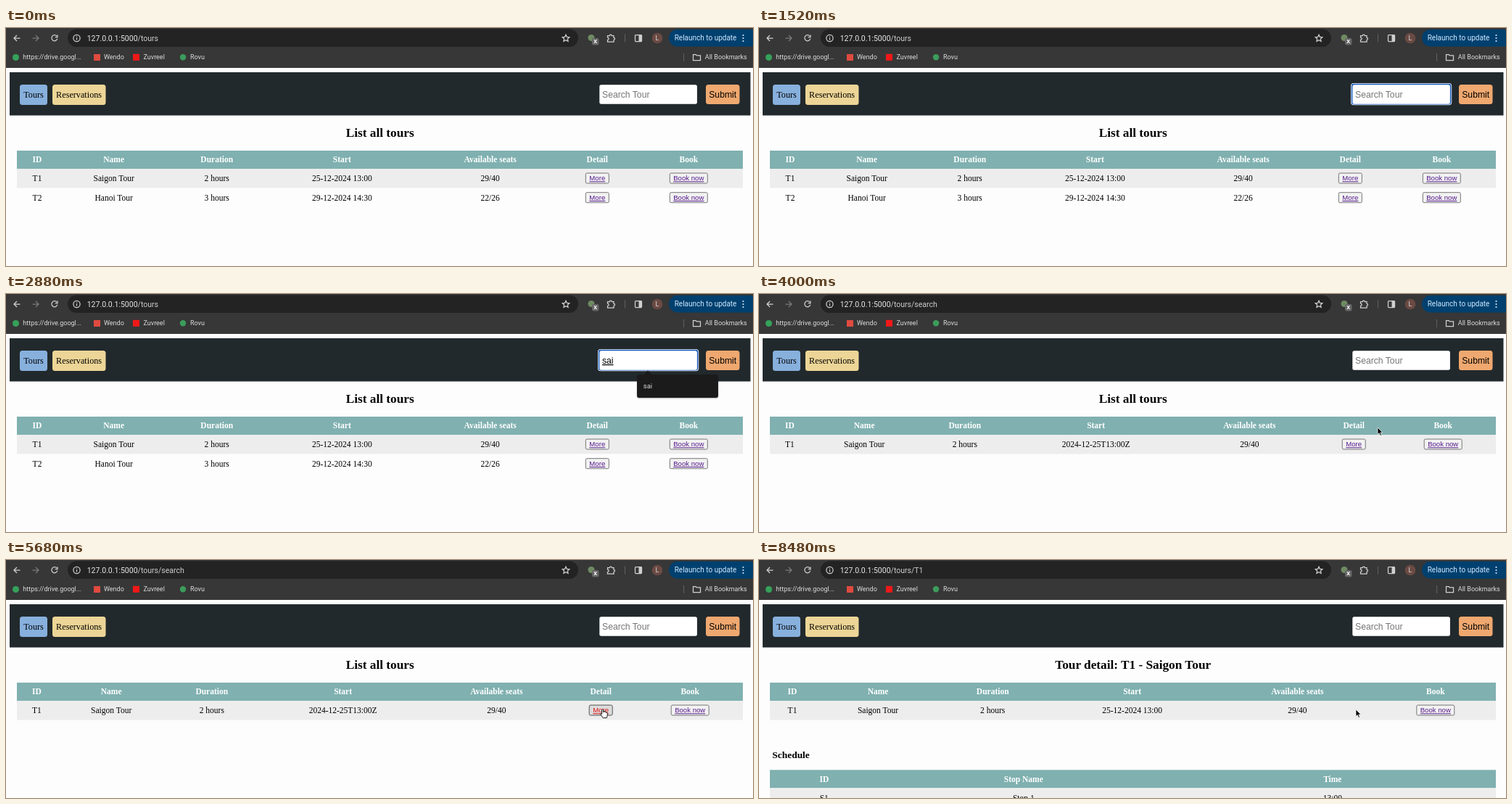
These frames come from a looping animation (1030 by 328 pixels, 8560 ms). An HTML page:

```html
<!DOCTYPE html>
<html lang="en">
<head>
<meta charset="utf-8">
<title>Tours</title>
<style>
  html, body { margin: 0; width: 100%; height: 100%; overflow: hidden; background: #fdfdfd; }
  svg { display: block; }
  text { white-space: pre; }
  .ui { font-family: Roboto, Inter, sans-serif; font-size: 9px; fill: #dcdcdc; }
  .serif { font-family: "Liberation Serif", "Times New Roman", serif; font-size: 11.5px; }
  .sans { font-family: "Liberation Sans", Arial, sans-serif; font-size: 12.2px; }
  .mid { text-anchor: middle; }
  .bold { font-weight: bold; }
  .link { font-size: 9.6px; fill: #551a8b; text-decoration: underline; }
  .btn { fill: #f2f2f2; stroke: #767676; }
  .active .btn { fill: #dcdcdc; stroke: #555; }
  .active .link { fill: #e01010; }
  .line { fill: none; stroke: #d0d0d0; stroke-width: 1.25; }
</style>
</head>
<body>
<svg width="1030" height="328" viewBox="0 0 1030 328">
  <rect width="1030" height="328" fill="#fdfdfd"/>

  <!-- Browser bar -->
  <rect width="1030" height="55" fill="#373737"/>
  <rect x="85" y="1.5" width="704" height="24.5" rx="12.25" fill="#232323"/>
  <g class="line">
    <path d="M19.5 14H11M15 10l-4 4 4 4"/>
    <path d="M36.5 14H45M41 10l4 4-4 4" stroke="#7b7b7b"/>
    <path d="M70 11.2A4 4 0 1 0 70.8 14.7M71 9.5V12.6H67.8"/>
    <circle cx="97.5" cy="14" r="4.6"/>
    <path d="M97.5 13.2V16.6M97.5 11.2V12.3"/>
    <path d="M772 9.2l1.4 3.1 3.4.4-2.5 2.3.7 3.3-3-1.7-3 1.7.7-3.3-2.5-2.3 3.4-.4z"/>
    <path d="M829.5 10.5h2.8a1.5 1.5 0 0 1 3 0h2.7v2.8a1.5 1.5 0 0 1 0 3v2.7h-8.5v-2.6a1.6 1.6 0 0 0 0-3.2z"/>
    <path d="M853.5 8.5V19.5M934.5 35V46" stroke="#606060" stroke-width="1"/>
    <rect x="867.5" y="9.5" width="9" height="9" rx="1"/>
    <path d="M947.5 36.5h3.6l1.3 1.4h5.1v6.6h-10z"/>
  </g>
  <rect x="872.5" y="9.5" width="4" height="9" fill="#d0d0d0"/>
  <circle cx="807" cy="13.5" r="4.5" fill="#6f8a62"/>
  <rect x="808" y="14" width="9.5" height="9.5" rx="2" fill="#666"/>
  <text class="ui mid bold" x="812.7" y="21.4" style="font-size:7.5px;fill:#fff">X</text>
  <circle cx="898" cy="14" r="7.3" fill="#6b4a43"/>
  <text class="ui mid" x="898" y="17">L</text>
  <rect x="914" y="2" width="124" height="23.5" rx="11.75" fill="#00406f"/>
  <text class="ui" x="921.7" y="17.3" style="font-size:10px;fill:#cfe9ff">Relaunch to update</text>
  <g fill="#cfe9ff">
    <circle cx="1016.5" cy="10" r="1.1"/><circle cx="1016.5" cy="14" r="1.1"/><circle cx="1016.5" cy="18" r="1.1"/>
  </g>
  <text class="ui" x="111.7" y="17.6" style="font-size:10.5px;fill:#e8e8e8">127.0.0.1:5000<tspan id="path" fill="#cccccc"></tspan></text>
  <circle cx="13.5" cy="40.5" r="4.5" fill="#35a25a"/>
  <text class="ui" x="23.3" y="43.4">https://drive.googl...</text>
  <rect x="121" y="36" width="9" height="9" fill="#e04a3f"/>
  <text class="ui" x="135" y="43.4">Wendo</text>
  <rect x="175" y="35.8" width="9" height="9" fill="#f01818"/>
  <text class="ui" x="189.5" y="43.4">Zuvreel</text>
  <circle cx="244" cy="40.3" r="4.2" fill="#3c9c5c"/>
  <text class="ui" x="254" y="43.4">Rovu</text>
  <text class="ui" x="963.8" y="43.4">All Bookmarks</text>

  <!-- Page navigation -->
  <rect x="5" y="61" width="1021.5" height="59.5" fill="#22292c"/>
  <rect x="19" y="78" width="38" height="28" rx="3.5" fill="#87b0dd"/>
  <rect x="64" y="78" width="73.5" height="28" rx="3.5" fill="#ecd596"/>
  <g class="serif mid" style="font-size:12.2px">
    <text x="38" y="96">Tours</text>
    <text x="100.6" y="96">Reservations</text>
  </g>
  <g id="ring">
    <rect x="816" y="76" width="139.2" height="30.2" rx="4" fill="#fff"/>
    <rect x="816.8" y="76.8" width="137.6" height="28.6" rx="3.4" fill="#1458b8"/>
  </g>
  <rect x="818.3" y="78.3" width="134.6" height="26.4" rx="2.5" fill="#fff"/>
  <text id="hint" class="sans" x="822" y="96" fill="#757575">Search Tour</text>
  <text id="typed" class="sans" x="822" y="96" text-decoration="underline"></text>
  <rect id="caret" y="85" width="1" height="13" fill="#000"/>
  <rect x="965" y="78" width="46.5" height="27" rx="3.5" fill="#efa86f"/>
  <text class="sans mid" x="988.2" y="96">Submit</text>

  <g id="pages"></g>

  <g id="suggest">
    <rect x="869.5" y="111.5" width="113" height="33" rx="3.5" fill="#000" opacity=".18"/>
    <path d="M879 111.5L885 105.5L891 111.5z" fill="#1b1b1b"/>
    <rect x="870" y="111" width="112" height="32" rx="3" fill="#1b1b1b"/>
    <text class="ui" x="878.8" y="130.3" style="font-size:9.4px">sai</text>
  </g>

  <g id="cursor">
    <path id="arrow" d="M0 0V9.6L2.2 7.6 3.8 11.2 5.4 10.5 3.9 7 6.9 6.9z" fill="#000" stroke="#fff" stroke-width=".7"/>
    <path id="beam" d="M-2.2-5.5Q0-5.5 0-4Q0-5.5 2.2-5.5M0-4.5V4.5M-2.2 5.5Q0 5.5 0 4Q0 5.5 2.2 5.5M-1.2 1.8H1.2" fill="none" stroke="#111"/>
    <path id="hand" d="M-1.4.6Q-.4-.7.7.6V4Q2-.1+2.6 3.4Q4 2.8 4.4 4.2Q6.2 3.8 6.2 5.4V8.2Q6 9.6 5.2 11.6H.2Q-1.4 9-3.5 6.4Q-3.6 4.8-1.4 6.4z" fill="#fff" stroke="#111" stroke-width=".95"/>
  </g>
</svg>
<script>
const STEP = 80, LOOP = 8560;
const FOCUS = 880, FOUND = 2960, PRESS = 5520, DETAIL = 5840, RELEASE = 6800;
const $ = id => document.getElementById(id);
const show = (id, on) => $(id).setAttribute('visibility', on ? 'visible' : 'hidden');

const rect = (x, y, w, h, fill) => `<rect x="${x}" y="${y}" width="${w}" height="${h}" fill="${fill}"/>`;
const text = (x, y, s, cls) => `<text x="${x}" y="${y}" class="${cls}">${s}</text>`;

function button(x, y, label) {
  const w = label === 'More' ? 32 : 52;
  return `<g class="${label === 'More' ? 'more' : ''}">
    <rect class="btn" x="${x - w / 2}" y="${y - 7}" width="${w}" height="14" rx="1.8"/>
    ${text(x, y + 3.3, label, 'sans mid link')}</g>`;
}

// The first row of cells is the table head.
function table(top, xs, rows) {
  return rows.map((cells, i) => {
    const y = top + (i ? 25 + (i - 1) * 26.7 : 0);
    const back = i ? rect(15, y, 1001, 26.5, i % 2 ? '#ededed' : '#fdfdfd') : rect(15, y, 1001, 25, '#80b0b0');
    return back + cells.map((s, k) =>
      /^(More|Book now)$/.test(s) ? button(xs[k], y + 13, s)
      : text(xs[k], y + (i ? 17.2 : 16.4), s, i ? 'serif mid' : 'serif mid bold head')).join('');
  }).join('');
}

const page = (id, title, body) =>
  `<g id="${id}">${text(515.7, 150.3, title, 'serif mid bold title')}${body}</g>`;

const head = ['ID', 'Name', 'Duration', 'Start', 'Available seats', 'Detail', 'Book'];
$('pages').innerHTML =
  page('list', 'List all tours', table(169, [43, 148.7, 290.7, 463.3, 667.7, 815.3, 941.3], [
    head,
    ['T1', 'Saigon Tour', '2 hours', '25-12-2024 13:00', '29/40', 'More', 'Book now'],
    ['T2', 'Hanoi Tour', '3 hours', '29-12-2024 14:30', '22/26', 'More', 'Book now']])) +
  page('found', 'List all tours', table(169, [42.3, 145.2, 283.8, 464.6, 676.3, 820.2, 943.2], [
    head,
    ['T1', 'Saigon Tour', '2 hours', '2024-12-25T13:00Z', '29/40', 'More', 'Book now']])) +
  page('detail', 'Tour detail: T1 - Saigon Tour', table(169, [46, 164, 322.2, 514.6, 742.4, 932.8], [
    head.filter(s => s !== 'Detail'),
    ['T1', 'Saigon Tour', '2 hours', '25-12-2024 13:00', '29/40', 'Book now']]) +
    `<text x="18.3" y="272.5" class="serif bold" style="font-size:13.45px">Schedule</text>` +
    table(289.3, [89.8, 364.8, 790.8], [['ID', 'Stop Name', 'Time'], ['S1', 'Stop 1', '13:00']]));
document.querySelectorAll('.title').forEach(e => e.style.fontSize = '17.25px');
document.querySelectorAll('.head').forEach(e => e.style.fill = '#fff');

const keys = [[1600, 's'], [1840, 'sa'], [2080, 'sai']];
const typedAt = t => keys.reduce((s, [at, v]) => t >= at && t < FOUND ? v : s, '');

// Pointer stops: time, x, y
const stops = [[80, 906, 284], [800, 899, 94.5], [3120, 899, 94.5], [3840, 853, 184],
  [4320, 853, 184], [5040, 823, 206], [LOOP, 823, 206]];

function pointerAt(t) {
  let i = 0;
  while (i < stops.length - 2 && t >= stops[i + 1][0]) i++;
  const [a, x, y] = stops[i], [b, u, v] = stops[i + 1];
  const p = Math.max(0, Math.min(1, (t - a) / (b - a)));
  const e = p * p * (3 - 2 * p);
  return [x + (u - x) * e, y + (v - y) * e];
}

function pointerShape(t, x, y) {
  if (t < 80 || (t >= 1520 && t < 3120)) return '';
  if (x > 818 && x < 953 && y > 78 && y < 105) return 'beam';
  const overMore = x > 804 && x < 836 && y > 200 && y < 214;
  return overMore && t < RELEASE ? 'hand' : 'arrow';
}

function draw(t) {
  const name = t < FOUND ? 'list' : t < DETAIL ? 'found' : 'detail';
  for (const id of ['list', 'found', 'detail']) show(id, id === name);
  $('path').textContent = { list: '/tours', found: '/tours/search', detail: '/tours/T1' }[name];

  const focus = t >= FOCUS && t < FOUND;
  const typed = typedAt(t);
  const lastKey = keys.reduce((k, [at]) => t >= at ? at : k, FOCUS);
  show('ring', focus);
  show('hint', !typed);
  $('typed').textContent = typed;
  $('caret').setAttribute('x', 822 + (typed ? $('typed').getComputedTextLength() : 0));
  show('caret', focus && (t - lastKey) % 1000 < 500);
  show('suggest', typed);

  document.querySelector('#found .more').classList.toggle('active', t >= PRESS);

  const [x, y] = pointerAt(t);
  const shape = pointerShape(t, x, y);
  for (const id of ['arrow', 'beam', 'hand']) show(id, id === shape);
  $('cursor').setAttribute('transform', `translate(${x} ${y})`);
}

const start = performance.now();
function tick() {
  const t = (performance.now() - start) % LOOP;
  draw(Math.floor(t / STEP) * STEP);
  requestAnimationFrame(tick);
}
tick();
</script>
</body>
</html>
```
